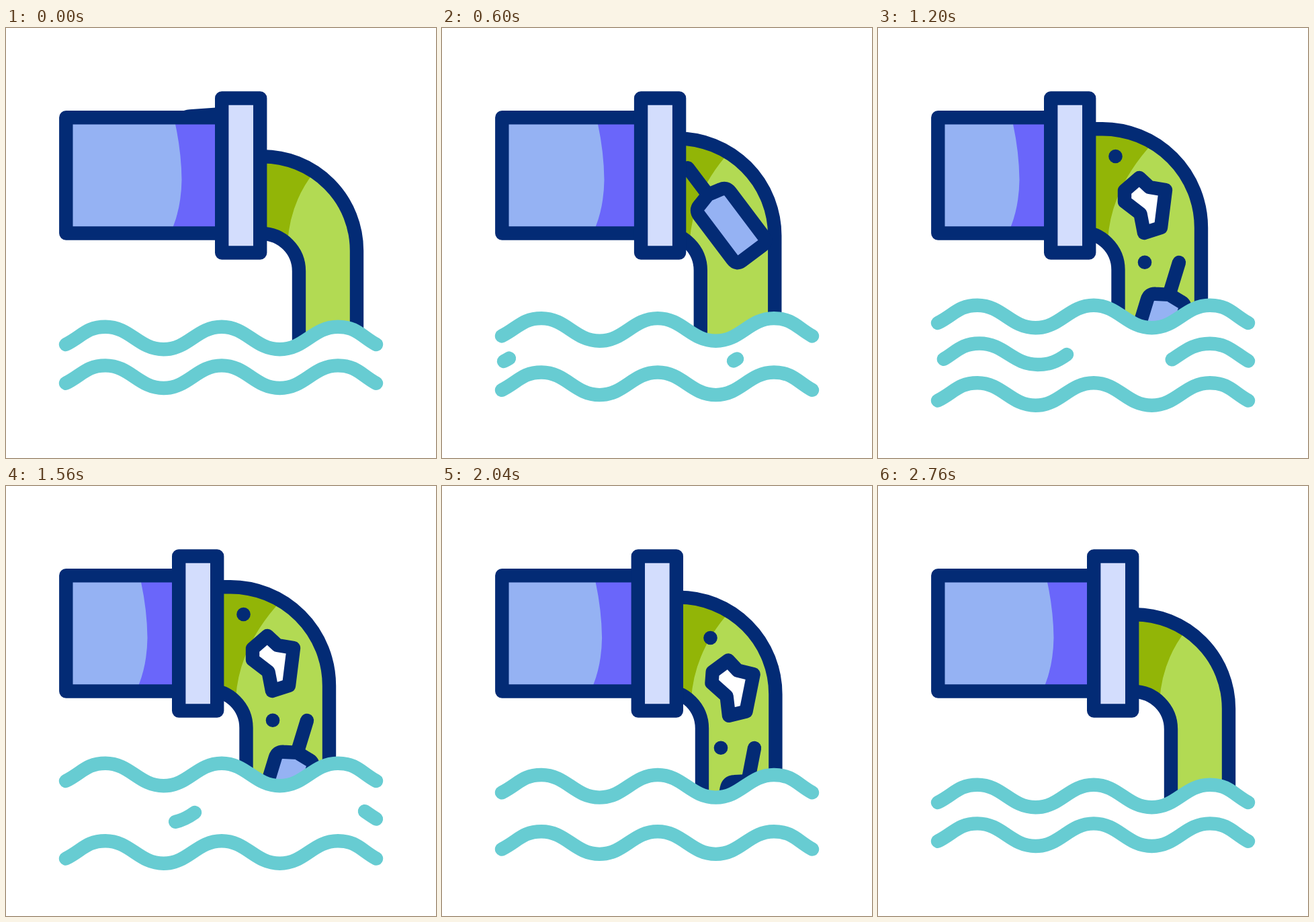
Animation, 640 px wide and 640 px high, one loop 2800 ms. Source, as an HTML page:

```html
<!DOCTYPE html>
<html lang="en">
<head>
<meta charset="utf-8">
<title>Waste pipe</title>
<style>
  html, body { margin: 0; width: 100%; height: 100%; overflow: hidden; background: #fff; }
  svg { display: block; width: 100%; height: 100%; }
  .line { fill: none; stroke: #032b75; stroke-width: 20.4; stroke-linecap: round; stroke-linejoin: round; }
  .wave { fill: none; stroke: #67ccd2; stroke-width: 20.4; stroke-linecap: round; }
</style>
</head>
<body>
<svg viewBox="0 0 640 640">
  <defs>
    <clipPath id="air"><path id="airShape"/></clipPath>
    <clipPath id="inStream"><path id="streamClip"/></clipPath>
  </defs>

  <g clip-path="url(#air)">
    <path id="stream" fill="#b2da53"/>
    <path id="shade" fill="#92b507" clip-path="url(#inStream)"/>
    <path id="banks" class="line"/>
    <g id="bottle" class="line">
      <path d="M0 0V50"/>
      <path fill="#95b2f3" d="M0 50L20 55Q29 57 29 67V149Q29 159 19 159H-19Q-29 159 -29 149V67Q-29 57 -20 55Z"/>
    </g>
    <path id="rock" class="line" style="fill:#fff" d="M-9-41L6-27 30-23 23 33-2 41-7.5 12.5-31-5.5-31-22Z"/>
    <circle id="dotA" r="10.3" fill="#032b75"/>
    <circle id="dotB" r="10.3" fill="#032b75"/>
  </g>

  <path id="body" fill="#95b2f3"/>
  <path id="bodyShade" fill="#6a66fa"/>
  <path id="bodyLine" class="line"/>
  <rect id="flange" class="line" style="fill:#d3ddfd" y="104.5" width="57" height="230"/>

  <path id="rippleA" class="wave" pathLength="100"
    d="M92 496C115 484.5 122 469.5 151 469.5c37 0 49.5 31.5 86.5 31.5C256 501 267 496 281 486"/>
  <path id="rippleB" class="wave" pathLength="100"
    d="M434 495.5C454 484 466 469.7 494 469.7C520 469.7 530 483 551 495.5"/>
  <path id="waveTop" class="wave"/>
  <path id="waveLow" class="wave"/>
</svg>

<script>
const LOOP = 2800, STEP = 40;
const $ = id => document.getElementById(id);
const set = (id, attrs) => {
  for (const k in attrs) $(id).setAttribute(k, attrs[k]);
};
const move = (id, x, y, r = 0) => set(id, { transform: `translate(${x} ${y}) rotate(${r})` });

// Eased 0..1 between two times
const ease = (t, a, b) => {
  const p = Math.min(1, Math.max(0, (t - a) / (b - a)));
  return p * p * (3 - 2 * p);
};

// Each piece curves from the pipe to its rest pose [x, y, turn], then drifts off and falls
const litter = {
  bottle: { from: [209, 165, -94], bend: [431, 179, -23], rest: [448, 349, 17], drift: [17, 41, -6] },
  rock: { from: [180, 225, -150], bend: [267, 208, -107], rest: [398, 264, 0], drift: [34, 37, 4.2] },
  dotA: { from: [200, 190, 0], bend: [241, 190, 0], rest: [353.5, 191, 0], drift: [46, 35, 0] },
  dotB: { from: [220, 200, 0], bend: [375, 281, 0], rest: [397, 348.7, 0], drift: [18, 41, 0] }
};

function drawLitter(t) {
  const u = ease(t, 100, 1180), v = 1 - u;
  const out = Math.max(0, t - 1557) / 483;
  const gain = [out ** 1.65, out ** 2.95, out ** 1.65];
  for (const id in litter) {
    const { from, bend, rest, drift } = litter[id];
    move(id, ...rest.map((end, i) =>
      v * v * from[i] + 2 * u * v * bend[i] + u * u * end + drift[i] * gain[i]));
  }
}

const down = 'c37 0 49.5 33.6 86.5 33.6', up = 'c37 0 49.5-33.6 86.5-33.6';
const wave = 'M89 471c24-12 31-26.3 59-26.3' + (down + up).repeat(2) + 'c28 0 35 14.3 57 26.3';
set('waveTop', { d: wave });
set('waveLow', { d: wave });
set('airShape', { d: wave + 'H640V0H0V471Z' });

function drawPipe(x, f) {
  const e = 51 * f;
  const box = `M${x} 133.3H89.3V305.5H${x}`;
  set('flange', { x });
  set('body', { d: box + 'Z' });
  set('bodyLine', { d: box });
  set('bodyShade', {
    d: `M${250 - e} 133L${252 - e} 143Q${261 - e} 185 ${261.5 - e} 226` +
       `Q${261 - e} 264 ${249 - e} 295L${245 - e} 305H${x}V133Z`
  });
}

function drawStream(x, s) {
  const right = 522 - 41 * s, top = 191.2 - 41 * s, r = 140 + 7 * s;
  const left = 436 - 78.5 * s, bend = 362 - 2 * s;
  const outer = `M${x} ${top}H${right - r}A${r} ${r} 0 0 1 ${right} ${top + r}V600`;
  const inner = `M${x} ${bend - 56}H${left - 56}A56 56 0 0 1 ${left} ${bend}V600`;
  const fill = `${outer}H${left}V${bend}A56 56 0 0 0 ${left - 56} ${bend - 56}H${x}Z`;
  set('stream', { d: fill });
  set('streamClip', { d: fill });
  set('banks', { d: outer + inner });
  set('shade', {
    d: `M200 100H${459 - 49 * s}V${214 - 44 * s}` +
       `Q${423 - 76 * s} ${259 - 21 * s} ${419 - 77 * s} ${320 - 5 * s}H200Z`
  });
}

function drawRipples(t) {
  const from = 100 * ease(t, 1140, 1700), to = 100 * ease(t, 529, 1089);
  const visibility = to > 0 && from < 100 ? 'visible' : 'hidden';
  for (const id of ['rippleA', 'rippleB']) {
    set(id, { visibility, 'stroke-dasharray': `${Math.max(0.01, to - from)} 300`, 'stroke-dashoffset': -from });
  }
}

function draw(t) {
  const f = ease(t, 230, 1095) - ease(t, 1557, 2473);
  const s = ease(t, 160, 890) - ease(t, 1657, 2577);
  const x = 321.2 - 64 * f;
  drawPipe(x, f);
  drawStream(x + 28, s);
  drawLitter(t);
  drawRipples(t);
  move('waveTop', 0, -32 * f);
  move('airShape', 0, -32 * f);
  move('waveLow', 0, 57.7 + 25.8 * f);
}

const start = performance.now();
function tick() {
  const t = (performance.now() - start) % LOOP;
  draw(Math.floor(t / STEP) * STEP);
  requestAnimationFrame(tick);
}
tick();
</script>
</body>
</html>
```
